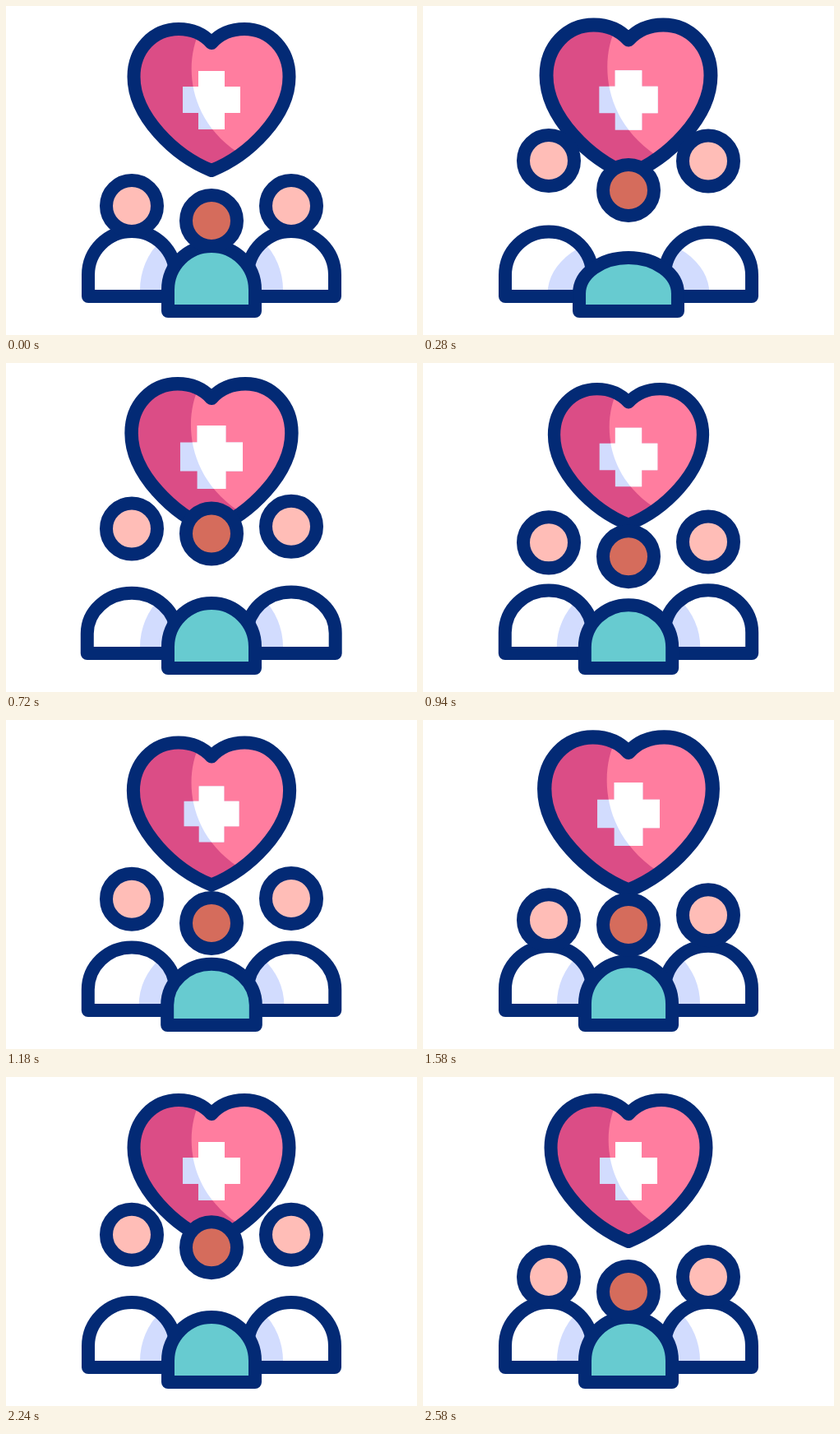
Recreate the animation shown at these times as an HTML page with a canvas. Size 500 by 400 pixels, loop 3.6 s.

```html
<!DOCTYPE html>
<html>
<head>
<meta charset="utf-8">
<style>
html, body { margin: 0; height: 100%; overflow: hidden; background: #fff; }
canvas { display: block; }
</style>
</head>
<body>
<canvas id="stage" width="500" height="400"></canvas>
<script>
const ctx = document.getElementById('stage').getContext('2d');
const LOOP = 3600, REST = 2580, HOP = 55;
const NAVY = '#032a75', LAVENDER = '#d2dcfe', SKIN = '#ffbdb7';

const heart = new Path2D('M250 45C240 34 226 28 210 28C179 28 155.5 53 155.5 86C155.5 134 205 182 250 200C295 182 344.5 134 344.5 86C344.5 53 321 28 290 28C274 28 260 34 250 45Z');
const lit = new Path2D('M236 30C218 65 218 135 282 178L400 300V0H236Z');
const cross = new Path2D('M234 79h32v19h19v32h-19v20h-32v-20h-19v-32h19z');

// lands: when the head meets the shoulders; depth: how far the first landing presses
const people = [
  { x: 153, base: 353, skin: SKIN, shirt: '#fff', lands: [550, 1060, 1570, 2000], depth: 15 },
  { x: 347, base: 353, skin: SKIN, shirt: '#fff', lands: [530, 1070, 1530, 2000], depth: 15 },
  { x: 250, base: 371, skin: '#d56c5c', shirt: '#67cbd0', lands: [405, 1110, 1510, 1960], depth: 22 }
];
const front = people[2];

const bump = x => Math.abs(x) < 1 ? Math.cos(x * Math.PI / 2) ** 2 : 0;

// Two heartbeats, eased over four equal steps
function pulse(t, start, step) {
  const sizes = [1, 1.095, .955, 1.095, 1];
  const u = Math.min(Math.max((t - start) / step, 0), 3.9999);
  const i = Math.floor(u), p = u - i;
  return sizes[i] + (sizes[i + 1] - sizes[i]) * p * p * (3 - 2 * p);
}

// Each landing presses a quarter as deep as the one before
function press(person, t, width) {
  return person.lands.reduce((sum, land, i) =>
    sum + person.depth / 4 ** i * bump((t - land) / width), 0);
}

function headOffset(person, t) {
  if (t >= REST) return 0;
  const stops = [0, ...person.lands, REST];
  const i = stops.findIndex(stop => stop > t);
  const p = (t - stops[i - 1]) / (stops[i] - stops[i - 1]);
  return .7 * press(person, t, 120) - HOP * Math.sin(p * Math.PI) ** 2;
}

function bodyScale(person, t) {
  const q = press(person, t, 300);
  return [1 + q * q / 28 / 53, 1 - q / 79];
}

function zoom(s) {
  ctx.translate(250, 114);
  ctx.scale(s, s);
  ctx.translate(-250, -114);
}

function drawHeart(t) {
  const size = pulse(t, 0, 490), crossSize = pulse(t, 135, 510);
  ctx.save();
  zoom(size);
  ctx.fillStyle = '#db4d86';
  ctx.fill(heart);
  ctx.save();
  ctx.clip(heart);
  ctx.fillStyle = '#ff7d9f';
  ctx.fill(lit);
  ctx.restore();
  ctx.stroke(heart);

  zoom(crossSize / size);
  ctx.fillStyle = LAVENDER;
  ctx.fill(cross);
  zoom(size / crossSize);
  ctx.clip(lit);
  zoom(crossSize / size);
  ctx.fillStyle = '#fff';
  ctx.fill(cross);
  ctx.restore();
}

function drawBody(person, t) {
  const { x, base } = person;
  const [sx, sy] = bodyScale(person, t);
  const body = new Path2D();
  body.moveTo(x - 53 * sx, base);
  body.ellipse(x, base - 26 * sy, 53 * sx, 53 * sy, 0, Math.PI, 0);
  body.lineTo(x + 53 * sx, base);
  body.closePath();
  ctx.fillStyle = person.shirt;
  ctx.fill(body);
  if (person !== front) {
    // Shade cast by the person in front
    const [fx, fy] = bodyScale(front, t);
    ctx.save();
    ctx.clip(body);
    ctx.fillStyle = LAVENDER;
    ctx.beginPath();
    ctx.ellipse(front.x, front.base - 26 * fy, 87 * fx, 85 * fy, 0, 0, 7);
    ctx.fill();
    ctx.restore();
  }
  ctx.stroke(body);
}

function drawHead(person, t) {
  ctx.beginPath();
  ctx.arc(person.x, person.base - 110 + headOffset(person, t), 31, 0, 7);
  ctx.fillStyle = person.skin;
  ctx.fill();
  ctx.stroke();
}

function frame() {
  const t = performance.now() % LOOP;
  ctx.clearRect(0, 0, 500, 400);
  ctx.strokeStyle = NAVY;
  ctx.lineWidth = 16;
  ctx.lineJoin = 'round';
  drawHeart(t);
  for (const person of people) {
    drawBody(person, t);
    drawHead(person, t);
  }
  requestAnimationFrame(frame);
}
frame();
</script>
</body>
</html>
```
